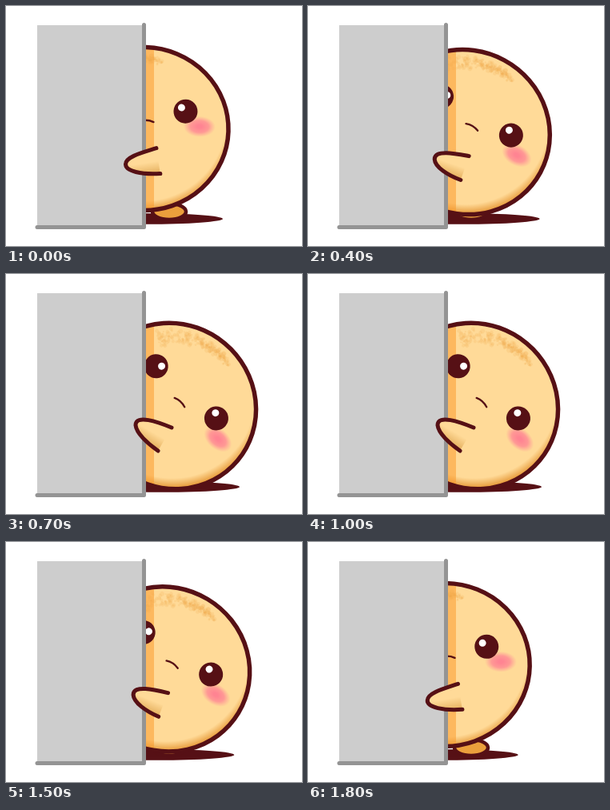
Animation of 370 by 300 pixels, one loop 2 s. Source, as an HTML page with a canvas:

```html
<!DOCTYPE html>
<html lang="en">
<head>
<meta charset="utf-8">
<title>Peekaboo</title>
<style>
html, body { margin: 0; width: 370px; height: 300px; overflow: hidden; background: #fff; }
canvas { display: block; }
</style>
</head>
<body>
<canvas id="stage" width="370" height="300"></canvas>
<script>
const ctx = document.getElementById('stage').getContext('2d');
const DARK = '#561015', SKIN = '#ffda98';
const LOOP = 2000, STEP = 100, LAST = 1800;

const ease = x => (1 - Math.cos(Math.PI * Math.min(1, Math.max(0, x)))) / 2;
const lerp = (a, b, p) => a + (b - a) * p;

// How far the character leans out from behind the wall, 0 to 1.
const lean = t => t < 1000 ? ease((t + 110) / 800) : 1 - ease((t - 1340) / 510);
const shadowReach = t => t < 1000 ? Math.min(1, 0.3 + t * 0.00155) : lean(t);

function ellipse(x, y, rx, ry, fill, stroke, width) {
  ctx.beginPath();
  ctx.ellipse(x, y, rx, ry, 0, 0, 2 * Math.PI);
  if (fill) { ctx.fillStyle = fill; ctx.fill(); }
  if (stroke) { ctx.strokeStyle = stroke; ctx.lineWidth = width; ctx.stroke(); }
}

function line(width, color, ...points) {
  ctx.beginPath();
  points.forEach(([x, y]) => ctx.lineTo(x, y));
  ctx.strokeStyle = color;
  ctx.lineWidth = width;
  ctx.stroke();
}

let seed = 7;
const random = () => (seed = seed * 16807 % 2147483647) / 2147483647;
const speckles = Array.from({ length: 190 }, () => {
  const along = Math.pow(random(), 1.25);
  const angle = (-142 + 66 * along) * Math.PI / 180;
  const radius = 87 + (random() + random() - 1) * 12 * (1 - along * 0.6);
  return [radius * Math.cos(angle), radius * Math.sin(angle), 1 + random() * 2];
});

function drawFace() {
  for (const [x, y, r] of speckles) ellipse(x, y, r, r, 'rgba(235,165,75,.17)');

  ctx.save();
  ctx.translate(70, -5);
  ctx.scale(1, 0.65);
  const blush = ctx.createRadialGradient(0, 0, 3, 0, 0, 20);
  blush.addColorStop(0, 'rgba(255,132,146,1)');
  blush.addColorStop(0.5, 'rgba(255,136,148,.8)');
  blush.addColorStop(1, 'rgba(255,150,150,0)');
  ellipse(0, 0, 20, 20, blush);
  ctx.restore();

  for (const [x, y, shine] of [[52, -23.5, -5.2], [-47.5, -25, 5.2]]) {
    ellipse(x, y, 15, 15, DARK);
    ellipse(x + shine, y - 4.5, 4.5, 4.5, '#fff');
  }

  ctx.beginPath();
  ctx.moveTo(-4.5, -9.5);
  ctx.quadraticCurveTo(4, -12.5, 12.5, -8.8);
  ctx.strokeStyle = DARK;
  ctx.lineWidth = 2.3;
  ctx.stroke();
}

function drawBody(p) {
  const cx = 170 + 38 * p, cy = 153.5 + 11.5 * p ** 3, angle = p * 40 * Math.PI / 180;
  const outline = new Path2D();
  outline.ellipse(cx, cy, 106.3, 102, angle, 0, 2 * Math.PI);

  const shade = ctx.createRadialGradient(cx, cy - 14, 0, cx, cy - 14, 117);
  shade.addColorStop(0.89, SKIN);
  shade.addColorStop(1, '#e59633');
  ctx.fillStyle = shade;
  ctx.fill(outline);

  ctx.save();
  ctx.clip(outline);
  ctx.fillStyle = 'rgba(251,152,38,.5)';
  ctx.fillRect(170, 40, 15, 240);
  ctx.translate(cx, cy);
  ctx.rotate(angle);
  drawFace();
  ctx.restore();

  ctx.strokeStyle = DARK;
  ctx.lineWidth = 5.5;
  ctx.stroke(outline);
}

const ARM_IN = [187, 177, 170, 183, 149, 189, 149, 198, 148, 207, 170, 211, 193, 209];
const ARM_OUT = [207, 192, 190, 185, 162, 175, 162, 189, 163, 199, 177, 212, 190, 221];

function drawArm(p) {
  const a = ARM_IN.map((v, i) => lerp(v, ARM_OUT[i], p));
  ctx.beginPath();
  ctx.moveTo(a[0], a[1]);
  ctx.bezierCurveTo(...a.slice(2, 8));
  ctx.bezierCurveTo(...a.slice(8));
  const shade = ctx.createLinearGradient(a[0], a[1], a[12], a[13]);
  shade.addColorStop(0.5, SKIN);
  shade.addColorStop(1, '#e3ad5a');
  ctx.fillStyle = shade;
  ctx.fill();
  ctx.strokeStyle = DARK;
  ctx.lineWidth = 5;
  ctx.stroke();
}

function drawWall() {
  ctx.fillStyle = '#cdcdcd';
  ctx.fillRect(39, 24, 133, 252);
  line(5, '#949494', [172.5, 23.5], [172.5, 276.5], [39, 276.5]);
}

function draw(t) {
  const p = lean(t);
  ctx.clearRect(0, 0, 370, 300);
  ctx.lineCap = ctx.lineJoin = 'round';
  ellipse(167 + 30 * shadowReach(t), 266, 95, 6.8, DARK);
  ellipse(204, 257, 21, 10, '#eb9f3c', DARK, 4.5);
  drawBody(p);
  drawWall();
  drawArm(p);
}

function tick() {
  const t = performance.now() % LOOP;
  draw(Math.min(LAST, Math.floor(t / STEP) * STEP));
  requestAnimationFrame(tick);
}
tick();
</script>
</body>
</html>
```
